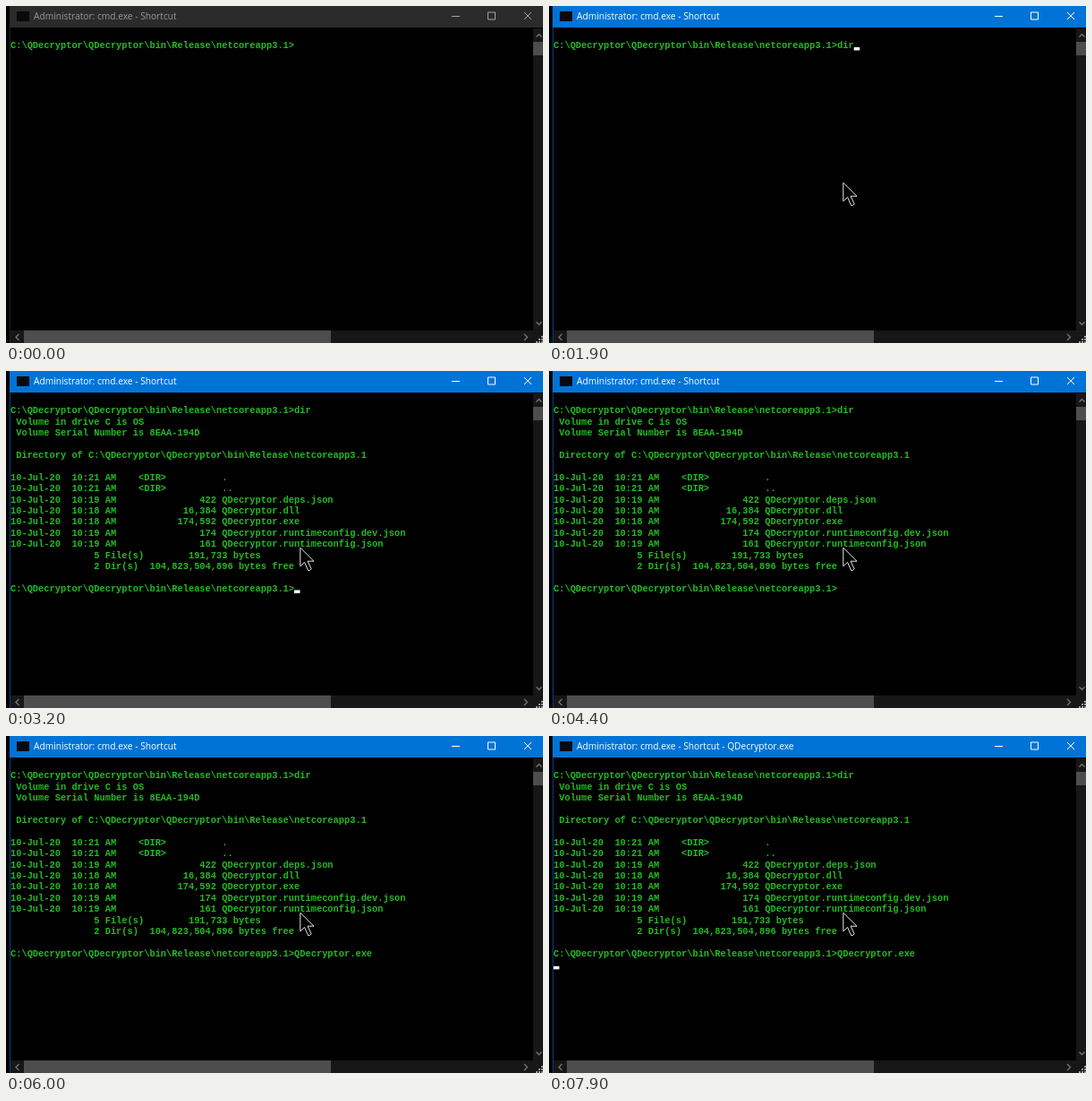
Animation of 600x376 px, one loop 8 s. Source, as an HTML page:

```html
<!DOCTYPE html>
<html lang="en">
<head>
<meta charset="utf-8">
<title>Console</title>
<style>
html, body { margin: 0; width: 100%; height: 100%; overflow: hidden; background: #000; }
svg { display: block; }
text { white-space: pre; }
.title { font: 10.2px "Open Sans", "Noto Sans", sans-serif; }
.line { font: bold 10.36px "Liberation Mono", "Courier New", monospace; fill: #22bc22; }
.icon { fill: none; stroke-width: 1; }
.arrow { fill: none; stroke: #757575; stroke-width: 1.3; }
</style>
</head>
<body>
<svg width="600" height="376" viewBox="0 0 600 376">
  <rect width="600" height="376"/>
  <rect id="edge" x="4" width="1" height="376"/>
  <rect id="bar" x="4" width="596" height="24"/>
  <rect x="12" y="6" width="14" height="11" fill="#0a0a0a"/>
  <text id="title" class="title" x="31" y="15"></text>
  <path id="buttons" class="icon" d="M498 11.5h9M538.5 7h8v8h-8zM579 7l8 8m0-8l-8 8"/>

  <rect x="589" y="25" width="11" height="351" fill="#171717"/>
  <rect x="5" y="362" width="595" height="14" fill="#171717"/>
  <rect x="589" y="40" width="11" height="15" fill="#4d4d4d"/>
  <rect x="20" y="362" width="343" height="14" fill="#4d4d4d"/>
  <path class="arrow" d="M592.5 34.5l3-3 3 3M592.5 352.5l3 3 3-3M14.5 366l-3.5 3.5 3.5 3.5M579 366l3.5 3.5-3.5 3.5"/>
  <path fill="#9a9a9a" d="M598 368h2v2h-2zM595 371h2v2h-2zM598 371h2v2h-2zM592 374h2v2h-2zM595 374h2v2h-2zM598 374h2v2h-2z"/>

  <g id="lines"></g>
  <rect id="caret" width="6.5" height="3.5" fill="#fff"/>
  <path id="mouse" d="M328.8 197.2v20.6l4.8-4.4 4 9.2q2 .2 3.6-1.8l-4.2-8.6h7z" fill="#000" stroke="#e4e4e4"/>
</svg>
<script>
const LOOP = 8000, LEFT = 5, CELL = 6.216, ROW = 12.4;
const PROMPT = 'C:\\QDecryptor\\QDecryptor\\bin\\Release\\netcoreapp3.1>';

const entry = (time, size, name) =>
  `10-Jul-20  ${time} AM` + (size ? size.padStart(18) : '    <DIR>         ') + ' ' + name;

const LISTING = [
  ' Volume in drive C is OS',
  ' Volume Serial Number is 8EAA-194D',
  '',
  ' Directory of ' + PROMPT.slice(0, -1),
  '',
  entry('10:21', '', '.'),
  entry('10:21', '', '..'),
  entry('10:19', '422', 'QDecryptor.deps.json'),
  entry('10:18', '16,384', 'QDecryptor.dll'),
  entry('10:18', '174,592', 'QDecryptor.exe'),
  entry('10:19', '174', 'QDecryptor.runtimeconfig.dev.json'),
  entry('10:19', '161', 'QDecryptor.runtimeconfig.json'),
  '5 File(s)        191,733 bytes'.padStart(45),
  '2 Dir(s)  104,823,504,896 bytes free'.padStart(51),
  ''
];

// [time, typed text]
const FIRST = [[0, ''], [1500, 'd'], [1700, 'di'], [1900, 'dir']];
const SECOND = [[0, ''], [4900, 'Q'], [5200, 'QD'], [5900, 'QDecryptor.exe']];
const CARET_ON = [[700, 1200], [1700, 2300], [2800, 3400], [3900, 4400],
                  [4900, 5300], [5500, 6000], [6500, 6900], [7500, 8000]];
const ACTIVE = 500, MOUSE = 700, LIST = 2700, RUN = 7500;

const $ = id => document.getElementById(id);
const typed = (steps, t) => steps.filter(s => s[0] <= t).pop()[1];

const rows = Array.from({ length: 18 }, (_, i) => {
  const row = document.createElementNS('http://www.w3.org/2000/svg', 'text');
  row.setAttribute('class', 'line');
  row.setAttribute('x', LEFT);
  row.setAttribute('y', 47.3 + i * ROW);
  return $('lines').appendChild(row);
});

function setText(el, text) {
  if (el.textContent !== text) el.textContent = text;
}

function screen(t) {
  const out = [PROMPT + typed(FIRST, t)];
  if (t >= LIST) out.push(...LISTING, PROMPT + typed(SECOND, t));
  if (t >= RUN) out.push('');
  return out;
}

function draw(t) {
  const active = t >= ACTIVE;
  $('bar').setAttribute('fill', active ? '#0074d6' : '#2b2b2b');
  $('edge').setAttribute('fill', active ? '#083c7c' : '#222');
  $('title').setAttribute('fill', active ? '#fff' : '#999');
  $('buttons').setAttribute('stroke', active ? '#fff' : '#a5a5a5');
  setText($('title'), 'Administrator: cmd.exe - Shortcut' + (t >= RUN ? ' - QDecryptor.exe' : ''));

  const out = screen(t), last = out.length - 1;
  rows.forEach((row, i) => setText(row, out[i] || ''));

  $('caret').setAttribute('x', LEFT + out[last].length * CELL);
  $('caret').setAttribute('y', 46 + last * ROW);
  $('caret').style.display = CARET_ON.some(([a, b]) => t >= a && t < b) ? '' : 'none';
  $('mouse').style.display = t >= MOUSE ? '' : 'none';
}

const start = performance.now();
function tick() {
  draw((performance.now() - start) % LOOP);
  requestAnimationFrame(tick);
}
tick();
</script>
</body>
</html>
```
